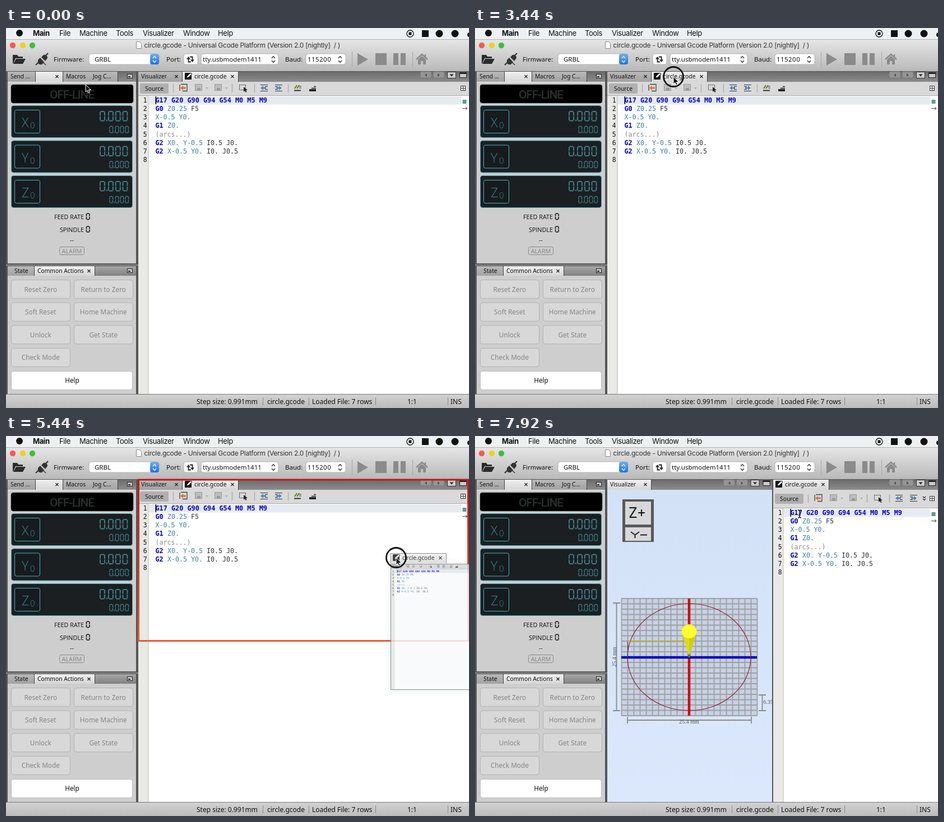
An HTML page for the animation above (8000 ms loop, 826 px wide and 678 px high).

```html
<!DOCTYPE html>
<html lang="en">
<head>
<meta charset="utf-8">
<title>circle.gcode</title>
<style>
  html, body { margin: 0; width: 100%; height: 100%; overflow: hidden; background: #c8c8c8; }
  svg { display: block; width: 826px; height: 678px; }
  text { font-family: "Noto Sans", "Open Sans", sans-serif; fill: #111; white-space: pre; }
  .menu { font: 13px Inter, sans-serif; letter-spacing: -.4px; }
  .strong { font-weight: 700; }
  .title { font: 12px Inter, sans-serif; letter-spacing: -.27px; fill: #333; }
  .tab { font-size: 10.3px; }
  .bar { font-size: 11.5px; }
  .status { font-size: 12px; }
  .btn { font-size: 11.8px; text-anchor: middle; }
  .off { fill: #858585; }
  .label { font: 10.8px "Open Sans", sans-serif; }
  .state { font: 500 21px Roboto, sans-serif; letter-spacing: -1.2px; fill: #2b2f2f; }
  .axis { font: 300 23px "Open Sans", sans-serif; fill: #2f8799; }
  .sub { font-size: 15px; }
  .code { font: 11.65px "DejaVu Sans Mono", monospace; }
  .num { font: 11.4px "DejaVu Sans Mono", monospace; text-anchor: end; }
  .g { font-size: 11.83px; font-weight: bold; fill: #0000c4; }
  .x { fill: #3b83a6; }
  .o { fill: #333; }
  .c { fill: #8a8a8a; }
  .cube { font: 25px Inter, sans-serif; }
  .dim { font: 10px "Liberation Serif", serif; fill: #555; text-anchor: middle; }
</style>
</head>
<body>
<svg id="stage" viewBox="0 0 826 678" xmlns="http://www.w3.org/2000/svg"></svg>
<script>
const R = (x, y, w, h, fill, more = '') =>
  `<rect x="${x}" y="${y}" width="${w}" height="${h}" fill="${fill}" ${more}/>`;
const T = (x, y, s, cls, more = '') => `<text x="${x}" y="${y}" class="${cls}" ${more}>${s}</text>`;
const L = (d, color = '#333', w = 1, fill = 'none') =>
  `<path d="${d}" stroke="${color}" stroke-width="${w}" fill="${fill}"/>`;
const F = (d, fill) => `<path d="${d}" fill="${fill}"/>`;
const C = (x, y, r, fill, more = '') => `<circle cx="${x}" cy="${y}" r="${r}" fill="${fill}" ${more}/>`;
const G = (x, y, body) => `<g transform="translate(${x} ${y})">${body}</g>`;
const grad = (id, a, b) => `<linearGradient id="${id}" x1="0" y1="0" x2="0" y2="1">
  <stop stop-color="${a}"/><stop offset="1" stop-color="${b}"/></linearGradient>`;

const defs = `<defs>
  ${grad('chrome', '#e6e6e6', '#b9b9b9')}${grad('strip', '#6c6c6c', '#8c8c8c')}
  ${grad('low', '#a6a6a6', '#828282')}
  ${grad('idle', '#b9b9b9', '#a2a2a2')}${grad('live', '#f0f0f0', '#d6d6d6')}
  ${grad('foot', '#d2d2d2', '#bcbcbc')}${grad('blue', '#6cb1f8', '#1d6fe6')}
  ${grad('sky', '#d3e1f6', '#dbe8fc')}
  <linearGradient id="hot" gradientUnits="userSpaceOnUse" x1="0" y1="77" x2="0" y2="366">
    <stop stop-color="#c41418"/><stop offset="1" stop-color="#ee5a2c"/></linearGradient>
  <filter id="soft" x="-20%" y="-20%" width="140%" height="140%"><feGaussianBlur stdDeviation="6"/></filter>
  <clipPath id="tools"><rect x="532" y="96" width="264" height="32"/></clipPath>
  <clipPath id="scene"><rect x="236" y="96" width="294" height="557"/></clipPath>
</defs>`;

const cross = (x, y) => L(`M${x - 2.5} ${y - 2.5}l5 5m0 -5l-5 5`, '#222', 1.2);
const tab = (x, y, w, h, name, live, close) =>
  R(x, y, w, h, `url(#${live ? 'live' : 'idle'})`) + L(`M${x + w + .5} ${y}v${h}`, '#444') +
  T(x + 5, y + 12, name, 'tab') + (close ? cross(x + w - 10, y + 8.5) : '');
const pencil = (x, y) => R(x, y, 12, 12, '#111', 'rx="1"') +
  L(`M${x + 3} ${y + 9}l1 -3l6 -6l3 2l-6 6z`, '#111', 1, '#fff');
const minimize = y => R(216.5, y + .5, 9, 7, '#c8c8c8', 'stroke="#222"') + R(218, y + 4, 4, 2, '#222');
const fileTab = x => tab(x, 78, 99, 18, '', true, true) + pencil(x + 4, 80) + T(x + 21, 90, 'circle.gcode', 'tab');
const controls = dx => G(dx, 0,
  R(739, 78, 20, 11, '#959595', 'rx="2" stroke="#777"') + R(762, 78, 20, 11, '#959595', 'rx="2" stroke="#777"') +
  F('M751 81v6l-4 -3zM770 81v6l4 -3z', '#555') +
  R(787.5, 78.5, 15, 11, '#ccc', 'stroke="#333"') + F('M791.5 82.5h7l-3.5 4z', '#222') +
  R(809.5, 79.5, 12, 9, '#ccc', 'stroke="#222"') + L('M809 81h13', '#222', 2));

function menuBar() {
  const items = [[95, 'File'], [131, 'Machine'], [196, 'Tools'], [244, 'Visualizer'], [316, 'Window'], [378, 'Help']];
  return R(0, 0, 826, 20, '#edf1f3') + C(24, 9, 6, '#111') + T(48, 14, 'Main', 'menu strong') +
    items.map(([x, s]) => T(x, 14, s, 'menu')).join('') +
    C(721, 10, 6, 'none', 'stroke="#111" stroke-width="1.3"') + R(718.5, 7.5, 5, 5, '#111') +
    R(742, 4, 12, 12, '#111') + C(773, 10, 6.5, '#111') + C(801, 10, 6.5, '#111') + C(827, 12, 4, '#111');
}

const stepper = x => L(`M${x - 3} 54l3 -3.5l3 3.5m-6 4l3 3.5l3 -3.5`, '#333', 1.3);
const field = (x, w) => R(x, 46, w, 19, '#fff', 'rx="4" stroke="#b4b4b4"');

function toolBar() {
  return R(0, 20, 826, 57, 'url(#chrome)') + L('M0 20.5h826', '#b0b0b0') +
    C(12, 31, 5.2, '#f35b4f') + C(30, 31, 5.2, '#f0cf1e') + C(47, 31, 5.2, '#38c23c') +
    L('M232.5 24.5h6l3 3v9h-9z', '#888', 1, '#fff') +
    T(246.5, 35, 'circle.gcode - Universal Gcode Platform (Version 2.0 [nightly]  / )', 'title') +
    F('M12 63V48h8l2 3h8v3H17l-4 9zM18 55h17l-5 9H13z', '#2b2b2b') +
    L('M53 66l6 -6M69 51l6 -6', '#333', 2.2) + F('M57 57l4 -4l7 8l-4 4q-4 1 -7 -2zM63 52l4 -4q4 -1 6 2t0 5l-3 4z', '#333') +
    L('M67 62l4 4', '#333', 1.5) +
    T(85, 60, 'Firmware:', 'bar') + field(148, 125) + T(158, 60, 'GRBL', 'bar') +
    R(257, 46, 16, 19, 'url(#blue)', 'rx="4"') + L('M262 54l3 -3.5l3 3.5m-6 4l3 3.5l3 -3.5', '#fff', 1.4) +
    T(286, 60, 'Port:', 'bar') + field(317, 25) +
    L('M330 60.5h-4.5v-6M328 51.500h4.500v6', '#222', 1.8) + F('M322 55.500h7l-3.5 -4.500zM329 56.500h7l-3.5 4.500z', '#222') +
    field(348, 138) + T(351, 60, 'tty.usbmodem1411', 'bar') + stepper(477) +
    T(498, 60, 'Baud:', 'bar') + field(535, 71) + T(538, 60, '115200', 'bar', 'letter-spacing=".45"') + stepper(596) +
    F('M627 45l19 11l-19 11zM659 45h20v21h-20zM691 45h9v21h-9zM704 45h9v21h-9z', '#8b8b8b') +
    L('M617.5 42v28', '#a8a8a8') + L('M725.5 42v28', '#a8a8a8') +
    L('M732 56l10 -9l10 9M748 47v5', '#8b8b8b', 2.5) + F('M735 56l7 -6l7 6v9h-5v-6h-4v6h-5z', '#8b8b8b');
}

// Seven-segment zero
const zero = (x, y, w, h, color, sw) => {
  const gap = sw * .3, s = h / 2 - 2 * gap;
  const side = X => `M${X} ${y + gap}v${s}M${X} ${y + h / 2 + gap}v${s}`;
  return L(`${side(x)}${side(x + w)}M${x + gap} ${y}h${w - 2 * gap}M${x + gap} ${y + h}h${w - 2 * gap}`, color, sw);
};
const reading = (x, y, k) => [0, 15, 27.75, 40.5].map(d => zero(x + d * k, y, 8 * k, 16.4 * k, '#3f7c8a', 2 * k)).join('') +
  R(x + 10.8 * k, y + 14.6 * k, 2.4 * k, 2.4 * k, '#3f7c8a');

function axisBox(name, i) {
  return G(0, 62.5 * i,
    R(9.5, 138.5, 216, 57, '#1b1f21', 'rx="4" stroke="#45a9c0"') +
    R(15.5, 146.5, 45, 41, '#171b1d', 'rx="3" stroke="#43b4cb"') +
    T(28, 177, name, 'axis') + T(43, 179, '0', 'axis sub') +
    reading(168, 149, 1) + reading(185, 175.5, .69));
}

function leftSide() {
  const acts = ['Reset Zero', 'Return to Zero', 'Soft Reset', 'Home Machine', 'Unlock', 'Get State', 'Check Mode'];
  const buttons = acts.map((s, i) => {
    const x = i % 2 ? 121 : 9, y = 449 + 40.6 * (i >> 1);
    return R(x + .5, y + .5, 105, 33, '#d8d8d8', 'rx="4" stroke="#b2b2b2"') + T(x + 52.8, y + 21.5, s, 'btn off');
  }).join('');
  return R(0, 77, 236, 577, '#565656') + R(3, 78, 229, 18, 'url(#strip)') +
    tab(3, 78, 49, 18, 'Send ...') + tab(53, 78, 48, 18, '', true, true) +
    tab(102, 78, 48, 18, 'Macros') + tab(150, 78, 49, 18, 'Jog C...') +
    minimize(82) + R(3, 96, 229, 324, '#cecece') + L('M3 96.5h229', '#eee') +
    R(9, 101, 218, 33, '#000', 'rx="4" stroke="#444" stroke-width=".6"') + T(78, 126, 'OFF-LINE', 'state') +
    ['X', 'Y', 'Z'].map(axisBox).join('') +
    T(139, 341, 'FEED RATE', 'label', 'text-anchor="end"') + zero(143.5, 331, 5.5, 10.5, '#111', 1.6) +
    T(139, 364, 'SPINDLE', 'label', 'text-anchor="end"') + zero(143.5, 354, 5.5, 10, '#111', 1.6) +
    T(117.5, 382, '--', 'label', 'text-anchor="middle"') +
    R(95.5, 390.5, 44, 14, 'none', 'rx="3" stroke="#888"') +
    T(117.5, 401.5, 'ALARM', 'label off', 'text-anchor="middle"') +
    R(0, 422, 236, 2, '#8a8a8a') + R(3, 425, 229, 17, 'url(#low)') +
    tab(3, 425, 47, 17, '') + T(15, 437, 'State', 'tab') +
    tab(51, 425, 107, 17, 'Common Actions', true, true) + minimize(429) +
    R(3, 442, 229, 211, '#cecece') + buttons +
    R(9.5, 612.5, 216, 33, '#fff', 'rx="4" stroke="#bcbcbc"') + T(118, 633, 'Help', 'btn');
}

const sep = x => L(`M${x}.5 100v15`, '#aaa', 1.4);
const shift = (x, d) => L(`M${x - 6} 101.5h13m-13 11h13M${x + (d > 0 ? -6 : 2)} 104.5h5m-5 5h5`, '#333') +
  F(`M${x + d * 6} 107l${-d * 5} -4v2.5h${-d * 5}v3h${d * 5}v2.5z`, '#4a86c8');
const icons = R(239, 99, 51, 18, '#b0b0b0', 'rx="2"') + T(248, 112, 'Source', 'tab') + sep(298) +
  L('M312 100.5h11v12h-8M310 101v11', '#444', 1.3) + F('M311 107l5 -4v2.5h5v3h-5v2.5z', '#e0703a') +
  [344, 379].map(x => R(x - 6.5, 100.5, 12, 11, '#bdbdbd', 'stroke="#999"') + R(x - 3, 107, 6, 5, '#999') +
    F(`M${x + 12} 106h5l-2.5 3z`, '#aaa')).join('') + sep(403) +
  R(416.5, 101.5, 11, 9, 'none', 'stroke="#333" stroke-dasharray="2 1"') + F('M424 105v9l2 -2l2 3l1.5 -1l-1.5 -3h3z', '#222') +
  sep(443) + shift(460, -1) + shift(486, 1) + sep(503) +
  L('M514 111.5h12', '#333', 2) + L('M515 108l4 -6m0 6l4 -6', '#5d7d20', 2) + L('M523 104h4m-4 3h4', '#333') +
  R(541, 109, 12, 4, '#222') + L('M545 107.5h8M549 104.5h4', '#222', 1.4);

const lines = [
  [['g', 'G17 G20 G90 G94 G54 M0 M5 M9']],
  [['g', 'G0 '], ['x', 'Z0.25 '], ['o', 'F5']],
  [['x', 'X-0.5 Y0.']],
  [['g', 'G1 '], ['x', 'Z0.']],
  [['c', '(arcs...)']],
  [['g', 'G2 '], ['x', 'X0. Y-0.5 '], ['o', 'I0.5 J0.']],
  [['g', 'G2 '], ['x', 'X-0.5 Y0. '], ['o', 'I0. J0.5']],
  []
];

function editor(x, drop) {
  const top = 121 + drop, clip = drop ? 'clip-path="url(#tools)"' : '';
  const rows = lines.map((parts, i) => {
    const y = top + 12 + 15.14 * i;
    return T(x + 15.5, y, i + 1, 'num') +
      T(x + 30.5, y, parts.map(([k, s]) => `<tspan class="${k}">${s}</tspan>`).join(''), 'code');
  }).join('');
  return R(x, 96, 826 - x, 25 + drop, '#d9d9d9') + `<g ${clip}>${G(x - 236, drop / 2, icons)}</g>` +
    (drop ? L('M799 108l2.5 2.5l2.5 -2.5m-5 4l2.5 2.5l2.5 -2.5', '#222', 1.2) : '') +
    G(0, drop / 2, R(811.5, 103.5, 8, 8, '#fff', 'stroke="#333"') + L('M815.5 103v9M811 107.5h9', '#333')) +
    R(x, top, 826 - x, 653 - top, '#fff') + R(x, top, 18, 653 - top, '#e9e9e6') +
    L(`M${x + 18} ${top}V653`, '#bbb') + L(`M${x} ${top - .5}H826`, '#aaa') +
    R(x + 19, top + 1, 793 - x, 14.5, '#e6ebf1') + rows + R(x + 30.5, top + 1, 1.5, 14, '#000') +
    R(814.5, top + 7, 7, 7, '#5c9999') + L(`M814 ${top + 22.5}h9m-3 -2.5l3 2.5l-3 2.5`, '#444');
}

const mainView = R(236, 77, 590, 577, '#565656') + R(236, 78, 590, 18, 'url(#strip)') +
  tab(236, 78, 78, 18, 'Visualizer', false, true) + fileTab(315) + controls(0) + editor(236, 0);

function scene() {
  let grid = '';
  for (let i = 0; i <= 22; i++) grid += `M${261.5 + 11 * i} 290v209M261 ${290 + 9.5 * i}h242`;
  return R(236, 96, 294, 557, 'url(#sky)') +
    R(263, 113, 56, 76, '#58595b') + R(268, 117, 46, 41, '#d8d8d8') + R(268, 163, 46, 24, '#d8d8d8') +
    T(274, 146, 'Z+', 'cube') +
    L('M278 171l7.5 5.5l7.5 -5.5M285.5 176v6M295 176.5h12', '#222', 2) +
    R(261, 290, 242, 209, '#c6d2e6') + L(grid, '#a0a0a0', 1.8) +
    L('M382 290v209', '#dc0000', 4.5) + L('M261 395h242', '#0000c0', 4.5) +
    '<ellipse cx="382" cy="394.5" rx="110" ry="95.5" fill="none" stroke="#8c2020" stroke-width="1.1"/>' +
    L('M272.5 366v29', '#333') + L('M272 366.5h110', '#b9aa28', 2) +
    F('M369 350L382 394L395 350z', '#dede10') + F('M382 350v44l13 -44z', '#cfcf10') +
    '<ellipse cx="382" cy="348.5" rx="13.5" ry="12.5" fill="#ffff2e"/>' +
    R(380.5, 390, 3, 5, '#3a9a30') +
    L('M252.5 298V490M246 298h13M246 490h13M272 507h221M272 501v12M493 501v12M512.5 462v28M506 462h13M506 490h13', '#8a8a8a', 1.8) +
    T(382, 513, '25.4 mm', 'dim') +
    T(0, 0, '25.4 mm', 'dim', 'transform="translate(252 394) rotate(-90)"') +
    T(523, 478, '6.35', 'dim');
}

const splitView = R(236, 77, 590, 577, '#565656') + R(236, 78, 294, 18, 'url(#strip)') +
  tab(236, 78, 78, 18, 'Visualizer', true, true) + controls(-295.5) +
  `<g clip-path="url(#scene)">${scene()}</g>` +
  R(532, 78, 294, 18, 'url(#strip)') + fileTab(532) + controls(0) + editor(532, 8);

const footer = R(0, 654, 826, 24, 'url(#foot)') + L('M0 653.5h826', '#777') +
  T(340, 671, 'Step size: 0.991mm', 'status') + T(466, 671, 'circle.gcode', 'status') +
  T(546, 671, 'Loaded File: 7 rows', 'status') + T(716, 671, '1:1', 'status') + T(793, 671, 'INS', 'status') +
  [458, 540, 659, 788].map(x => L(`M${x}.5 659v14`, '#8a8a8a')).join('');

const ghost = R(0, 19, 225, 225, '#5a7a9a', 'opacity=".16" filter="url(#soft)"') +
  '<g opacity=".8">' + G(-315, -78, fileTab(315)) + L('M.5 18V.5H99.5V18', '#777') +
  `<g transform="translate(0 19) scale(${224 / 590} ${224 / 557}) translate(-236 -96)">${editor(236, 0)}</g>` +
  R(.5, 19.5, 224, 224, 'none', 'stroke="#777"') + '</g>';

const arrow = L('M0 0V13L3 10.3L5 15L7.3 14L5.3 9.5H9.5z', '#fff', 1, '#111');
const beam = L('M-3 -7q3 0 3 2.5v9q0 2.5 -3 2.5M3 -7q-3 0 -3 2.5M0 4.5q0 2.5 3 2.5M-2 2h4', '#222', 1.4);
const frame = (x, y, w, h, color, id) => R(x, y, w, h, 'none', `id="${id}" stroke="${color}" stroke-width="3"`);

const stage = document.getElementById('stage');
stage.innerHTML = defs + menuBar() + toolBar() + leftSide() +
  `<g id="main">${mainView}</g><g id="split">${splitView}</g>` + footer +
  frame(236.5, 78, 588, 287.5, 'url(#hot)', 'half') + frame(530.5, 78, 294, 575.5, '#e9532b', 'side') +
  `<g id="ghost">${ghost}</g>` +
  `<g id="ring">${C(0, 0, 17.5, 'none', 'stroke="#111" stroke-width="2.8"')}</g>` +
  `<g id="arrow">${arrow}</g><g id="beam">${beam}</g>`;

const LOOP = 8000, STEP = 80, DROP = 6320, SPLIT = 6480;
const pointer = [[0, 142, 101], [2240, 142, 101], [3120, 354, 87], [3680, 354, 87], [4800, 531, 147],
  [5440, 696, 217], [6080, 761, 235], [6480, 764, 237], [7600, 579, 139], [LOOP, 579, 139]];
const carried = [[3680, 352, 88], [4800, 534, 148], [5440, 686, 209], [6080, 758, 234], [LOOP, 762, 237]];
// Windows of time in which each part is shown
const shown = {
  main: [0, SPLIT], split: [SPLIT, LOOP], arrow: [0, SPLIT], beam: [SPLIT, LOOP],
  ring: [3200, DROP], ghost: [3840, DROP], half: [3840, 5760], side: [5760, DROP]
};
const part = id => document.getElementById(id);

function at(path, t) {
  let i = 1;
  while (i < path.length - 1 && t > path[i][0]) i++;
  const [t0, x0, y0] = path[i - 1], [t1, x1, y1] = path[i];
  let k = Math.min(1, Math.max(0, (t - t0) / (t1 - t0)));
  if (t < 3680 || t > SPLIT) k = k * k * (3 - 2 * k);
  return [x0 + (x1 - x0) * k, y0 + (y1 - y0) * k];
}
const place = (id, [x, y]) => part(id).setAttribute('transform', `translate(${x.toFixed(1)} ${y.toFixed(1)})`);

let start;
function draw(now) {
  start ??= now;
  const t = Math.floor(((now - start) % LOOP) / STEP) * STEP;
  for (const [id, [from, to]] of Object.entries(shown))
    part(id).style.display = t >= from && t < to ? '' : 'none';
  const p = at(pointer, t);
  ['arrow', 'beam', 'ring'].forEach(id => place(id, p));
  place('ghost', at(carried, t));
  requestAnimationFrame(draw);
}
requestAnimationFrame(draw);
</script>
</body>
</html>
```
